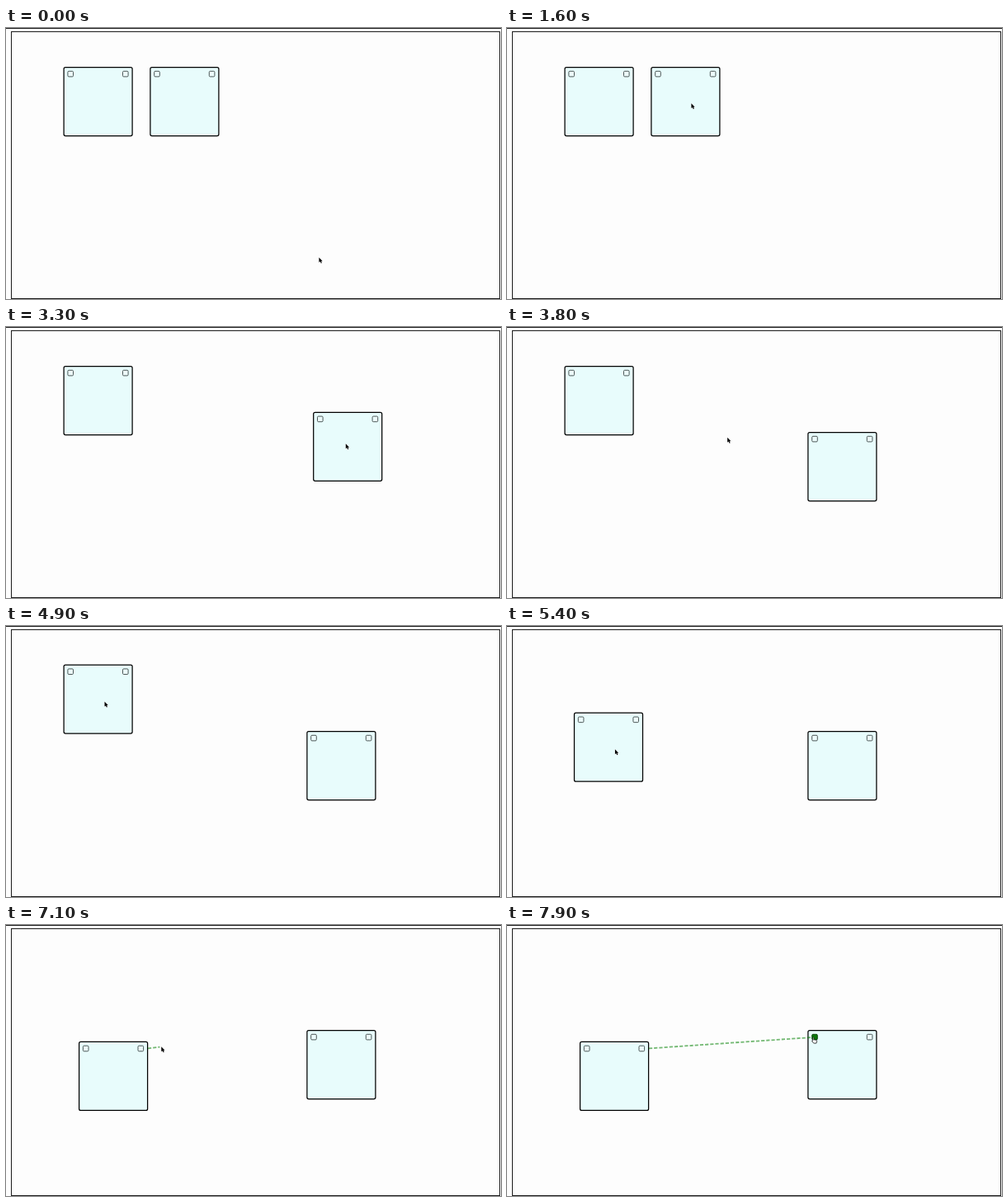
These frames come from a looping animation (600 px wide and 328 px high, 8 s). An HTML page:

```html
<!DOCTYPE html>
<html lang="en">
<head>
<meta charset="utf-8">
<title>Connecting two nodes</title>
<style>
  html, body { margin: 0; width: 100%; height: 100%; overflow: hidden; background: #fdfdfd; }
  svg { display: block; }
  .frame { fill: none; stroke: #1c1c1c; }
  .card { fill: #e8fcfc; stroke: #000; stroke-width: 1.25; }
  .port { fill: #ecfcfc; stroke: #3c4444; stroke-width: .9; }
  .port.on { fill: #0a770a; stroke: #064006; }
  #link { stroke: green; stroke-opacity: .55; stroke-width: 1.8; stroke-dasharray: 4.2 2; }
  .pointer { stroke: #fff; stroke-width: .7; paint-order: stroke; }
  .hand { fill: #fff; stroke: #111; stroke-width: .75; stroke-linejoin: round; }
</style>
</head>
<body>
<svg width="600" height="328" viewBox="0 0 600 328">
  <path class="frame" d="M0 .5H600"/>
  <rect class="frame" x="6.5" y="4.5" width="592" height="323"/>
  <g id="a"></g>
  <g id="b"></g>
  <line id="link"/>
  <g id="cursor">
    <path class="pointer" d="M0 0V6L1.4 4.8L2.4 7L3.5 6.5L2.5 4.4H4.3Z"/>
    <path class="hand" d="M-.6 .4Q0 -.4 .6 .4V3L3.8 3.5Q4.5 3.8 4.3 5L3.7 7.3H.5L-1.8 4.5Q-1.6 3.6 -.6 4.3Z"/>
  </g>
</svg>
<script>
const LOOP = 8000, TICK = 100;
const $ = id => document.getElementById(id);

// Each move: start, end (in ticks), then the place it reaches
const cursorMoves = [
  [1, 2, 235.5, 155.3], [3, 6, 216, 96.5], [8, 11, 213.8, 91.6],
  [15, 16, 223.4, 91.3], [16, 18, 264, 104], [18, 19, 262.3, 103.2], [20, 26, 214.8, 85.4],
  [28, 29, 226.3, 84.5], [29, 33, 411.8, 141.3], [33, 36, 402.8, 165],
  [37, 39, 131.5, 102.5], [41, 44, 125.3, 100], [46, 49, 119.5, 91.6],
  [50, 57, 138.2, 186], [57, 58, 138, 185.1],
  [59, 65, 169.5, 151], [65, 68, 163.8, 148.8],
  [69, 78, 373, 136.6], [78, 79, 371.3, 135.8]
];
const movesA = [[41, 42, 70.1, 47.1], [50, 57, 88.8, 142.2], [57, 58, 88.6, 141.4]];
const movesB = [[28, 29, 185.4, 47.5], [29, 33, 372.7, 103.3], [33, 36, 364.9, 127.5]];

const ease = k => (1 - Math.cos(Math.PI * k)) / 2;

function at(moves, tick, x, y) {
  for (const [from, to, toX, toY] of moves) {
    if (tick <= from) break;
    const k = ease(Math.min(1, (tick - from) / (to - from)));
    x += (toX - x) * k;
    y += (toY - y) * k;
  }
  return [x, y];
}

const port = x => `<rect class="port" x="${x}" y="4.8" width="6.6" height="6.6" rx="1.2"/>`;
for (const id of ['a', 'b']) {
  $(id).innerHTML = '<rect class="card" width="83" height="83" rx="2"/>' + port(4.8) + port(71.4);
}
const outPort = $('a').lastElementChild;
const inPort = $('b').children[1];
const [arrow, hand] = $('cursor').children;

const move = (el, [x, y]) => el.setAttribute('transform', `translate(${x} ${y})`);
const near = ([x, y], px, py) => Math.abs(x - px) < 4.5 && Math.abs(y - py) < 4.5;

function draw(tick) {
  const c = at(cursorMoves, tick, 379.4, 277.8);
  const a = at(movesA, tick, 70.1, 47.5);
  const b = at(movesB, tick, 174.9, 47.5);
  move($('a'), a);
  move($('b'), b);
  move($('cursor'), c);

  const dragging = tick >= 70;
  const overOut = tick >= 60 && near(c, a[0] + 74.7, a[1] + 8.1);
  const overIn = dragging && near(c, b[0] + 8.1, b[1] + 8.1);
  outPort.classList.toggle('on', overOut);
  inPort.classList.toggle('on', overIn);
  arrow.style.display = overOut || overIn ? 'none' : '';
  hand.style.display = overOut || overIn ? '' : 'none';

  const start = a[0] + 83.4, end = c[0] - 1.8;
  const link = $('link');
  link.style.display = dragging && end > start ? '' : 'none';
  const ends = { x1: start, y1: a[1] + 8, x2: end, y2: c[1] + .2 };
  for (const k in ends) link.setAttribute(k, ends[k]);
}

const begin = performance.now();
function loop() {
  draw(Math.floor((performance.now() - begin) % LOOP / TICK));
  requestAnimationFrame(loop);
}
loop();
</script>
</body>
</html>
```
